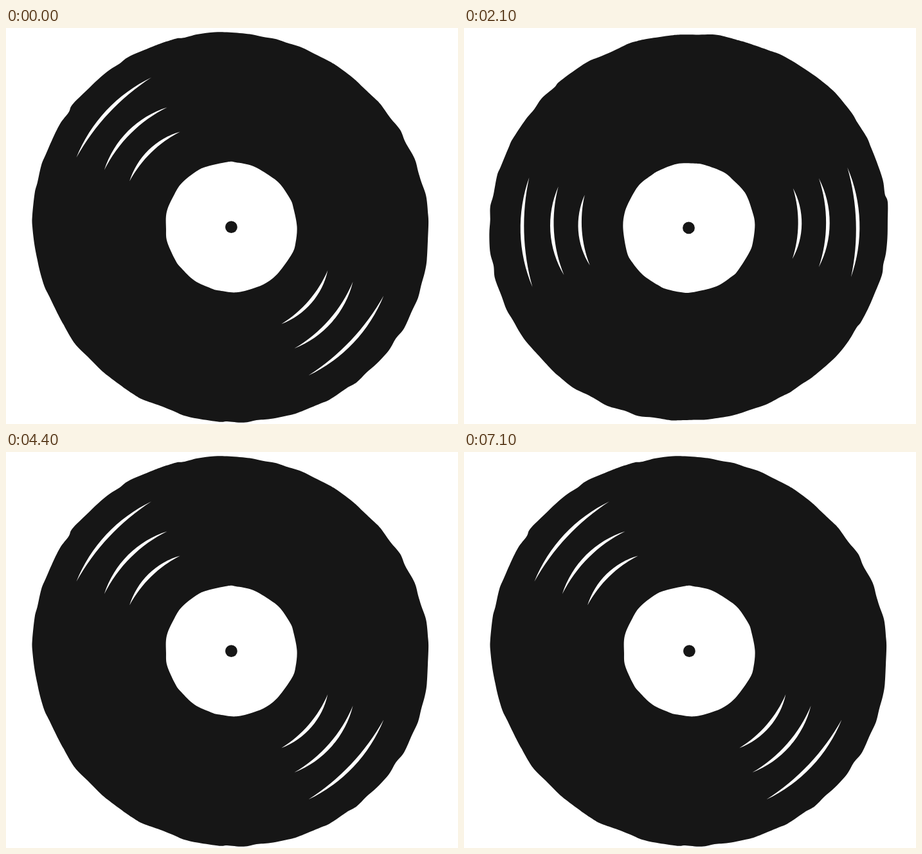
Recreate the animation shown at these times as an HTML page. Size 703x616 px, loop 7200 ms.

```html
<!DOCTYPE html>
<html lang="en">
<head>
<meta charset="utf-8">
<title>Spinning record</title>
<style>
  html, body { margin: 0; width: 100%; height: 100%; overflow: hidden; background: #fff; }
  svg { display: block; }
</style>
</head>
<body>
<svg width="703" height="616" viewBox="0 0 703 616">
  <g id="record">
    <path id="disc" fill="#161616"/>
    <path id="label" fill="#fff"/>
    <circle cx="350.4" cy="309.7" r="9.4" fill="#161616"/>
    <path id="shine" fill="#fff"/>
  </g>
</svg>
<script>
const STEP_MS = 100, STEPS = 8, TURN_MS = 900;
const RAD = Math.PI / 180;
const $ = id => document.getElementById(id);

let seed = 11;
const random = () => (seed = seed * 16807 % 2147483647) / 2147483647;
const jitter = size => (random() * 2 - 1) * size;

const polar = (cx, cy, radius, degrees) =>
  [cx + radius * Math.cos(degrees * RAD), cy + radius * Math.sin(degrees * RAD)];

// Closed Catmull-Rom curve through all points
function smooth(points) {
  const n = points.length;
  const at = i => points[(i + n) % n];
  const handle = (i, sign) => at(i).map((v, k) => v + sign * (at(i + 1)[k] - at(i - 1)[k]) / 6);
  return 'M' + points[0] + points.map((_, i) =>
    `C${handle(i, 1)} ${handle(i + 1, -1)} ${at(i + 1)}`).join('') + 'Z';
}

// Hand-cut circle: slightly oval along a slanted axis, with an uneven edge
function roughCircle(cx, cy, radius, oval, roughness, count) {
  return smooth(Array.from({ length: count }, (_, i) => {
    const angle = (i + jitter(0.3)) * 360 / count;
    const r = radius + oval * Math.cos(2 * (angle - 32) * RAD) + jitter(roughness);
    return polar(cx, cy, r, angle);
  }));
}

// Curved highlight that is widest in the middle and pointed at both ends
function sliver({ radius, lean, bow }, side) {
  const middle = side > 0 ? 43.3 : 223.1, spread = 19, halfWidth = 2.8, segments = 16;
  const edge = sign => Array.from({ length: segments + 1 }, (_, i) => {
    const u = i / segments * 2 - 1;
    const r = radius + side * lean * u + (bow + sign * halfWidth) * (1 - u * u);
    return polar(348.6, 308.6, r, middle + spread * u);
  });
  return 'M' + [...edge(1), ...edge(-1).reverse()].join('L') + 'Z';
}

const rings = [
  { radius: 169, lean: 2.5, bow: 2 },
  { radius: 212, lean: 2.5, bow: 2.5 },
  { radius: 262, lean: 0, bow: -1 }
];

$('disc').setAttribute('d', roughCircle(350, 310, 305.2, 5.4, 1.6, 84));
$('label').setAttribute('d', roughCircle(350.4, 309.7, 101.6, 1.2, 0.7, 26));
$('shine').setAttribute('d', rings.flatMap(ring => [sliver(ring, 1), sliver(ring, -1)]).join(''));

function draw(now) {
  const step = Math.floor(now % TURN_MS / STEP_MS);
  $('record').setAttribute('transform', `rotate(${step * 360 / STEPS} 349.7 310.1)`);
  requestAnimationFrame(draw);
}
draw(performance.now());
</script>
</body>
</html>
```
